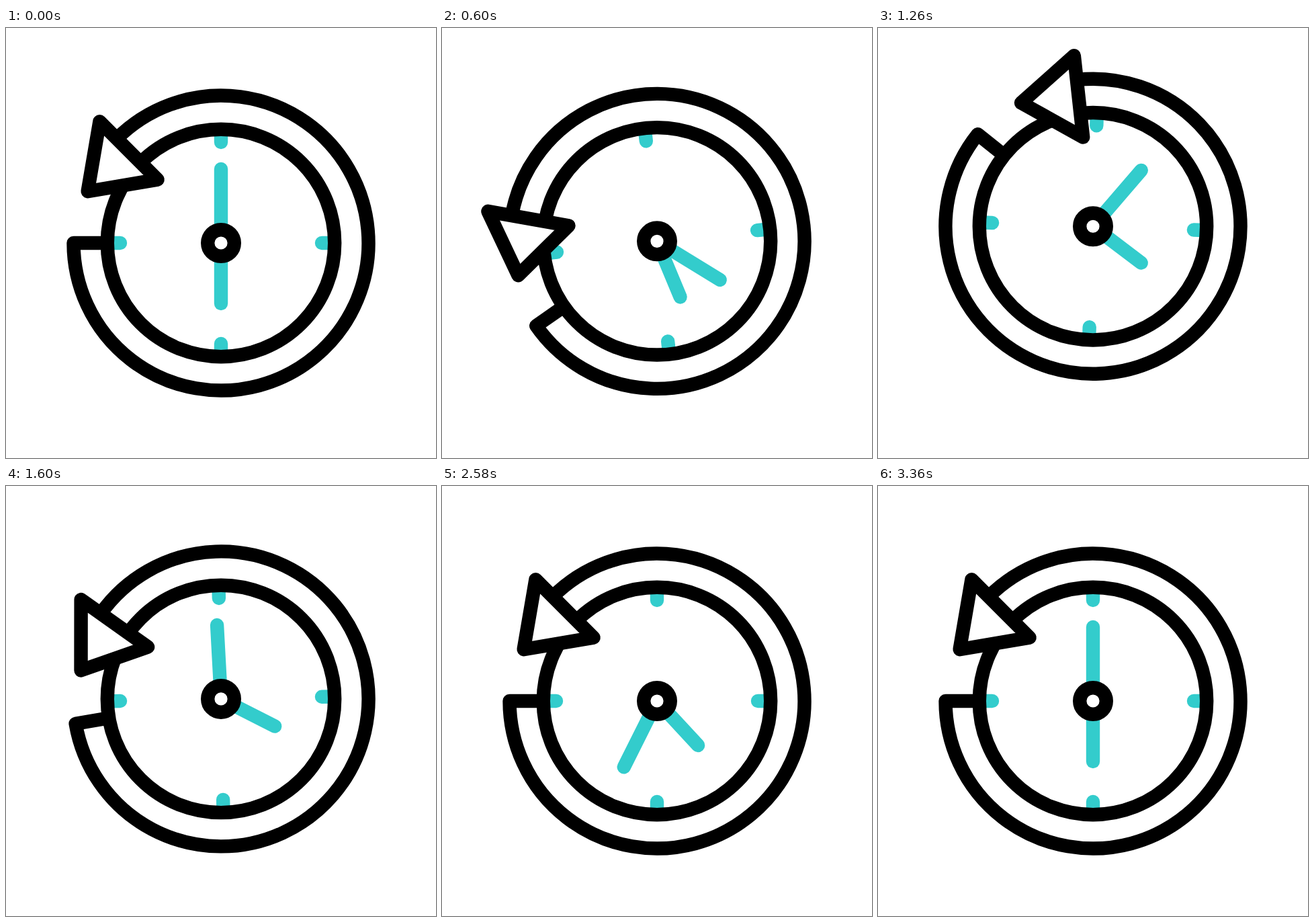
An HTML page for the animation above (3600 ms loop, 640 by 640 pixels).

```html
<!DOCTYPE html>
<html lang="en">
<head>
<meta charset="utf-8">
<title>Rewinding clock</title>
<style>
  html, body { margin: 0; width: 100%; height: 100%; overflow: hidden; background: #fff; }
  svg { display: block; width: 100vw; height: 100vh; }
  .ink { fill: none; stroke: #000; stroke-width: 20.4; stroke-linejoin: round; }
  .solid { fill: #fff; }
  .teal { fill: none; stroke: #3cc; stroke-width: 20.4; stroke-linecap: round; }
</style>
</head>
<body>
<svg viewBox="0 0 640 640">
  <g id="clock">
    <path id="ticks" class="teal" d="M0-165V-150M165 0H150M0 165V150M-165 0H-150"/>
    <circle class="ink" r="169.2"/>
    <g id="ring">
      <path class="ink" d="M-155.2-155.2A219.5 219.5 0 1 1-219.5 0H-169"/>
      <path class="ink solid" d="M-180.6-180.8L-198.4-76.8L-94.4-94.4Z"/>
    </g>
    <path id="minute" class="teal" d="M0 0V-110"/>
    <path id="hour" class="teal" d="M0 0V-90"/>
    <circle class="ink solid" r="19.8"/>
  </g>
</svg>
<script>
const LOOP = 3600, STEP = 20;
const $ = id => document.getElementById(id);
const clamp = x => Math.min(1, Math.max(0, x));

// Cubic bezier easing, as in CSS.
function bezier(x1, y1, x2, y2) {
  const at = (s, p, q) => 3 * s * (1 - s) * ((1 - s) * p + s * q) + s ** 3;
  return x => {
    if (x <= 0 || x >= 1) return clamp(x);
    let lo = 0, hi = 1;
    for (let i = 0; i < 24; i++) {
      const mid = (lo + hi) / 2;
      if (at(mid, x1, x2) < x) lo = mid; else hi = mid;
    }
    return at(lo, y1, y2);
  };
}

// Swings from rest through [time, value] keys with sine easing.
function swing(...keys) {
  return t => {
    let from = [0, 0];
    for (const to of keys) {
      if (t < to[0]) {
        const u = (t - from[0]) / (to[0] - from[0]);
        return from[1] + (to[1] - from[1]) * (1 - Math.cos(Math.PI * u)) / 2;
      }
      from = to;
    }
    return from[1];
  };
}

const windUp = bezier(0.525, -0.3, 0.49, 1.25);
const rewind = bezier(0.43, 0, 0.575, 1);
const advance = bezier(0.52, 0, 0.59, 1);

const lift = swing([405, -25.5], [820, 25], [1230, -25], [1710, 0]);
const tilt = swing([600, -6.2], [980, 4.4], [1600, -1.2], [1820, 0]);
const sway = swing([600, -3], [980, 9.3], [1600, -3.1], [1820, 0]);

const turn = (id, deg) => $(id).setAttribute("transform", `rotate(${deg.toFixed(3)})`);

function draw(t) {
  // The hands go two hours back, then two hours forward.
  const turns = 2 * (advance((t - 2020) / 1340) - rewind(t / 1500));
  $("clock").setAttribute("transform", `translate(320 ${(320 + lift(t)).toFixed(3)})`);
  turn("ticks", tilt(t));
  turn("ring", -360 * windUp(t / 1820));
  turn("minute", 360 * turns + sway(t));
  turn("hour", 180 + 30 * turns + sway(t));
}

const start = performance.now();
function tick() {
  const t = (performance.now() - start) % LOOP;
  draw(Math.floor(t / STEP) * STEP);
  requestAnimationFrame(tick);
}
tick();
</script>
</body>
</html>
```
